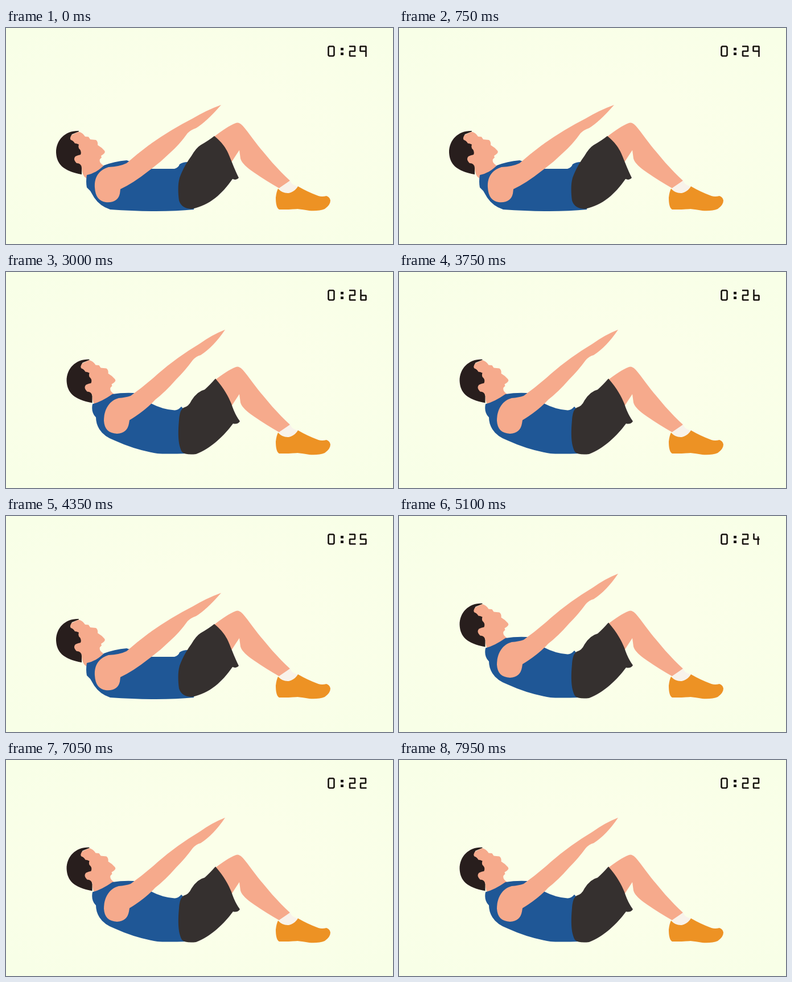
Write an HTML page that moves like this. It is 680 px wide and 382 px high and loops after 8000 ms.

```html
<!DOCTYPE html>
<html lang="en">
<head>
<meta charset="utf-8">
<title>Crunches</title>
<style>
  html, body { margin: 0; width: 100%; height: 100%; overflow: hidden; background: #fbffe9; }
  svg { display: block; width: 100%; height: 100%; }
  .skin { fill: #f6aa8c; }
  .hair { fill: #281e1d; }
  .shirt { fill: #1f5796; }
  .shorts { fill: #35302f; }
  .sock { fill: #f8f2ea; }
  .shoe { fill: #ed9224; }
  #clock path { fill: none; stroke: #17130f; stroke-width: 2.6; stroke-linejoin: bevel; }
  #clock rect { fill: #17130f; }
</style>
</head>
<body>
<svg viewBox="0 0 680 382">
  <defs>
    <radialGradient id="glow" cx=".5" cy=".5" r=".65">
      <stop offset=".4" stop-color="#fbffe9"/>
      <stop offset="1" stop-color="#f8ffe7"/>
    </radialGradient>
    <g id="head">
      <path class="skin" d="M127 183.500Q134 184 139 192L145 192.500L148 197L158 198Q162 201 161 207Q168 211 173 217Q176 221 167 226L168 229L165 232Q163 238 171 243Q167 254 142 266Q133 262 133 245L110 235L108 193Z"/>
      <path class="hair" d="M128 182C105 181 88 197 88 220C89 241 101 253 133 259L133 247Q132 239 124 239Q117 232 122 227Q126 225 131 224Q133 219 130 215Q126 212 128 206Q124 204 121 204Q118 199 114 198Q111 195 116 188Q121 186 128 183Z"/>
    </g>
  </defs>
  <rect width="680" height="382" fill="url(#glow)"/>

  <path class="skin" d="M366 192C380 181 393 172 404 168Q409 166 416 173C428 187 438 203 452 219Q474 247 499 270L481 284Q455 269 438 257Q415 242 412 231L410 216Q404 225 397 236L380 240Z"/>
  <path class="sock" d="M480 283L499 270L503 276L513 281L508 291L495 296L482 290Z"/>
  <path class="shoe" d="M478 284Q475 290 474 300Q474 318 480 321Q500 321 512 320Q522 321 533 323Q550 324 560 320Q570 313 570 305Q569 299 563 297Q555 299 549 297Q530 290 513 280Q508 289 497 292Q486 293 478 284Z"/>

  <g id="down">
    <use href="#head"/>
    <path class="shirt" d="M142 260Q158 257 172 243Q190 236 212 234L218 236L250 249L296 249Q303 247 305 241Q311 237 319 237L335 260L330 321Q270 327 183 321Q165 315 155 300L148 288L142 282Q140 272 142 260Z"/>
    <path class="shorts" d="M366 191C386 207 391 222 396 235Q403 253 409 265Q405 270 398 267C380 293 358 314 326 320Q308 319 304 305C302 290 302 275 305 265Q312 245 326 226Q334 212 342 207Q356 199 366 191Z"/>
    <path class="skin" d="M378 136Q353 145 328 160Q287 181 250 208Q230 223 212 239Q200 245 180 246C160 252 155 268 156 282C157 298 163 306 175 308Q196 310 200 293L201 285Q224 274 249 254Q270 239 288 221Q305 206 319 186Q325 180 334 177Q352 166 378 136Z"/>
  </g>

  <g id="up">
    <use href="#head" x="18.5" y="-27.5"/>
    <path class="shirt" d="M152 233.500Q167 230 187 216Q205 213 225 214L256 233Q275 243 296 244.500Q302 245 308 238L320 250L330 300L318 321Q280 322 266 321Q228 315 191 298Q172 291 164 278Q158 268 158 257Q149 248 152 233.500Z"/>
    <path class="shorts" d="M368 188.500C384 207 391 221 396 233Q402 252 411 264Q407 270 399 268C383 290 360 312 334 322Q315 324 309 318C302 305 302 285 304 262Q305 244 312 240Q321 238 326 227Q336 211 349 208Q358 200 368 188.500Z"/>
    <path class="skin" d="M385 102Q362 111 340 127Q300 151 267 180Q243 202 219 219Q210 222 198 223C180 228 172 245 172 263C173 278 180 285 195 286Q213 285 216 268L217 262Q245 245 262 226Q280 212 299 190Q315 174 328 156Q334 149 342 147Q365 132 385 102Z"/>
  </g>

  <g id="clock">
    <path id="minutes" transform="translate(565 31)"/>
    <rect x="588" y="35" width="5" height="4.5"/>
    <rect x="588" y="43.500" width="5" height="4.5"/>
    <path id="tens" transform="translate(602 31)"/>
    <path id="ones" transform="translate(621 31)"/>
  </g>
</svg>
<script>
const LOOP = 8000, STEP = 150;
const digits = {
  0: "M1.500 3V17L3 18.500H10L11.500 17V3L10 1.500H3Z",
  2: "M1 1.500H11V10H2V18.500H12.500",
  3: "M1 1.500H10.500V10M3 10H11.500V18.500H.5",
  4: "M2.500 0V10H12.500M10 5V20",
  5: "M12 1.500H2V10H11.500V18.500H.5",
  6: "M2.500 0V18.500H11.500V10.500H2.500",
  7: "M1.500 6V1.500H11.500V20",
  8: "M4 1.500H10V10H4ZM2 10H11.500V18.500H2Z",
  9: "M11.500 10H1.500V1.500H11.500V20"
};
const byId = id => document.getElementById(id);
const setDigit = (id, value) => byId(id).setAttribute("d", digits[value]);
const show = (id, on) => byId(id).setAttribute("visibility", on ? "visible" : "hidden");

setDigit("minutes", 0);
setDigit("tens", 2);

// The pose switches with every tick of the countdown.
function draw(now) {
  const time = Math.floor((now % LOOP) / STEP) * STEP;
  const second = Math.floor(time / 1000);
  setDigit("ones", 9 - second);
  show("up", second % 2 === 1);
  show("down", second % 2 === 0);
}

const start = performance.now();
function tick() {
  draw(performance.now() - start);
  requestAnimationFrame(tick);
}
tick();
</script>
</body>
</html>
```
